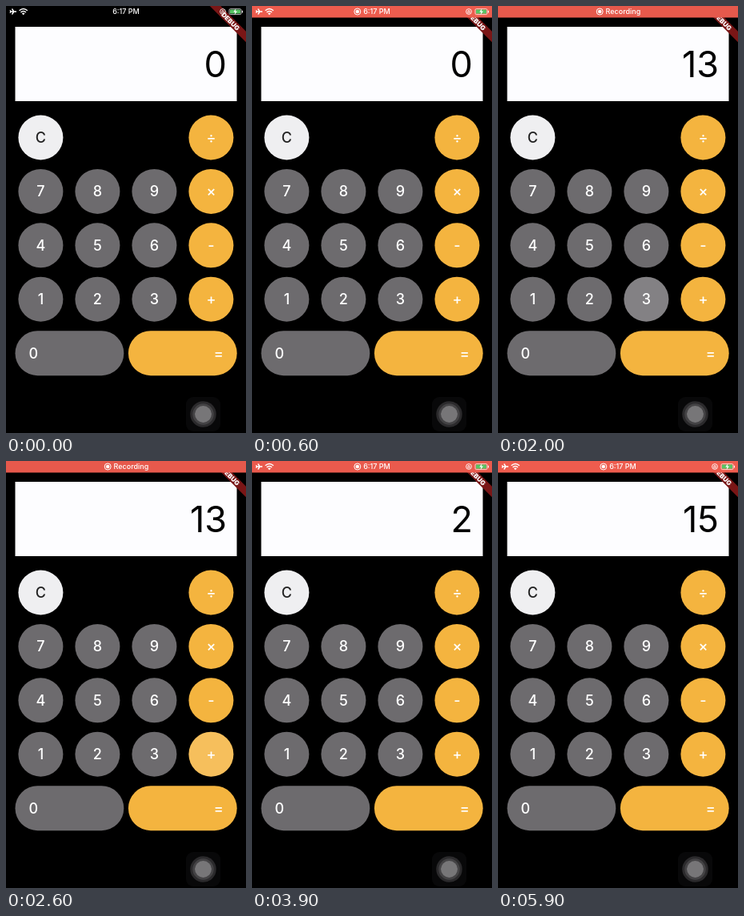
An HTML page for the animation above (6000 ms loop, 300 by 534 pixels).

```html
<!DOCTYPE html>
<html lang="en">
<head>
<meta charset="utf-8">
<title>Calculator</title>
<style>
  html, body { margin: 0; width: 100%; height: 100%; overflow: hidden; background: #000; }
  svg { display: block; }
  text { font-family: Inter, Roboto, sans-serif; fill: #fff; }
  .key { font-size: 18px; font-weight: 500; }
  .status { font-size: 9px; font-weight: 500; }
</style>
</head>
<body>
<svg id="stage" width="300" height="534" viewBox="0 0 300 534">
  <rect width="300" height="534"/>
  <rect x="11.5" y="26" width="277" height="93" fill="#fdfdff"/>
  <text id="display" x="276" y="88.5" font-size="45" text-anchor="end" style="fill:#000">0</text>
  <g id="keys"></g>

  <g id="assist">
    <rect x="225" y="489" width="43" height="43" rx="9" fill="#080809"/>
    <circle cx="246.5" cy="510.5" r="16.2" fill="#2b2a2c"/>
    <circle cx="246.5" cy="510.5" r="13.2" fill="#444345"/>
    <circle cx="246.5" cy="510.5" r="10.4" fill="#777678"/>
  </g>

  <g transform="translate(300 0) rotate(45)">
    <rect x="-40" y="22.4" width="80" height="9.6" fill="#7a1616"/>
    <text y="30.2" font-size="8.1" font-weight="900" text-anchor="middle">DEBUG</text>
  </g>

  <rect id="bar" width="300" height="14.5"/>
  <g id="icons" fill="none" stroke="#fff">
    <path d="M5 7H13M9.8 7L7.5 3.5M9.8 7L7.5 10.5M6 7L5 5.3M6 7L5 8.7" stroke-width="1.4"/>
    <path d="M16.6 5.8Q21.7 1.2 26.8 5.8M18.5 7.9Q21.7 5 24.9 7.9" stroke-width="1.5"/>
    <path d="M19.8 9.2Q21.7 7.6 23.6 9.2L21.7 11.3Z" fill="#fff" stroke="none"/>
    <circle cx="271" cy="7" r="3.4" stroke-width=".9"/>
    <path d="M269.7 6.8H272.3V8.6H269.7ZM270.2 6.8V5.8Q271 4.8 271.8 5.8V6.8" stroke-width=".7"/>
    <rect x="279" y="3.6" width="15" height="7" rx="1.5" stroke-width=".7"/>
    <rect x="280" y="4.6" width="13" height="5" rx=".7" fill="#58c565" stroke="none"/>
    <path d="M295.4 5.8V8.4" stroke-width="1.1"/>
    <path d="M287.5 3L284.3 7.6H286.5L285.5 11.2L289 6.5H286.7Z" fill="#fff" stroke="none"/>
  </g>
  <g id="clock">
    <text id="time" class="status" y="10.3" text-anchor="middle">6:17 PM</text>
  </g>
  <text id="recording" class="status" x="134.5" y="10.3" font-weight="600">Recording</text>
  <g id="dot">
    <circle cy="7" r="4" fill="none" stroke="#fff"/>
    <circle cy="7" r="2.3" fill="#fff"/>
  </g>
</svg>
<script>
const LOOP = 6000, GROW = 370, FADE = 200;
const $ = id => document.getElementById(id);
const set = (el, attrs) => { for (const k in attrs) el.setAttribute(k, attrs[k]); };
const clamp = x => Math.max(0, Math.min(1, x));
const GRAY = '#6d6b6e', ORANGE = '#f4b43f', LIGHT = '#efeff1';

// Each tap: key, start time, first x of the ripple, final radius
const taps = [
  { key: '1', at: 800, x: 43, r: 40 },
  { key: '3', at: 1700, x: 185, r: 40 },
  { key: '+', at: 2330, x: 256, r: 40 },
  { key: '2', at: 3300, x: 114, r: 40 },
  { key: '=', at: 4850, x: 266, r: 128 }
];
const values = [[0, '0'], [900, '1'], [1800, '13'], [3400, '2'], [4950, '15']];

function addKey(label, x, y, width, fill, align = 'middle') {
  const cx = x + width / 2;
  const tx = { start: x + 17, middle: cx, end: x + width - 17 }[align];
  const shape = `<rect x="${x}" y="${y - 28}" width="${width}" height="56" rx="28" fill="${fill}"/>`;
  const tap = taps.find(t => t.key === label);
  let ripple = '';
  if (tap) {
    tap.cx = cx;
    tap.id = 'ripple' + taps.indexOf(tap);
    ripple = `<clipPath id="${tap.id}c">${shape}</clipPath><g clip-path="url(#${tap.id}c)">` +
      `<circle id="${tap.id}" cy="${y}" r="0" fill="#fff"/></g>`;
  }
  const ink = fill === LIGHT ? '#222' : '#fff';
  return shape + ripple +
    `<text class="key" x="${tx}" y="${y + 6.5}" text-anchor="${align}" style="fill:${ink}">${label}</text>`;
}

let markup = '';
['C  ÷', '789×', '456-', '123+'].forEach((row, j) => [...row].forEach((label, i) => {
  if (label === ' ') return;
  const fill = i === 3 ? ORANGE : label === 'C' ? LIGHT : GRAY;
  markup += addKey(label, 15.4 + 71 * i, 164.5 + 67.4 * j, 56, fill);
}));
markup += addKey('0', 11.5, 434.2, 135.8, GRAY, 'start');
markup += addKey('=', 152.9, 434.2, 135.8, ORANGE, 'end');
$('keys').innerHTML = markup;

function draw(t) {
  $('display').textContent = values.filter(v => v[0] <= t).pop()[1];

  for (const { id, at, x, cx, r } of taps) {
    const p = clamp((t - at) / GROW);
    const fade = 1 - clamp((t - at - GROW) / FADE);
    set($(id), { cx: x + (cx - x) * p, r: r * p, opacity: 0.15 * fade });
  }

  // The bar turns red, then pulses
  const on = clamp((t - 50) / 250);
  const pulse = 0.5 + 0.5 * Math.cos((t - 5900) / 1800 * 2 * Math.PI);
  const mix = (a, b) => Math.round(on * (a + (b - a) * pulse));
  set($('bar'), {
    fill: `rgb(${mix(205, 238)},${mix(78, 92)},${mix(68, 78)})`,
    opacity: t < 50 ? 0 : 1
  });

  const rec = clamp((t - 1000) / 200) - clamp((t - 3300) / 200);
  set($('icons'), { opacity: 1 - rec });
  set($('clock'), { opacity: 1 - rec });
  set($('recording'), { opacity: rec });
  set($('time'), { x: t < 50 ? 150 : 156 });
  set($('dot'), { transform: `translate(${131.8 - 4.6 * rec} 0)`, opacity: on });
}

function tick(now) {
  draw(Math.floor(now % LOOP / 100) * 100);
  requestAnimationFrame(tick);
}
draw(0);
requestAnimationFrame(tick);
</script>
</body>
</html>
```
